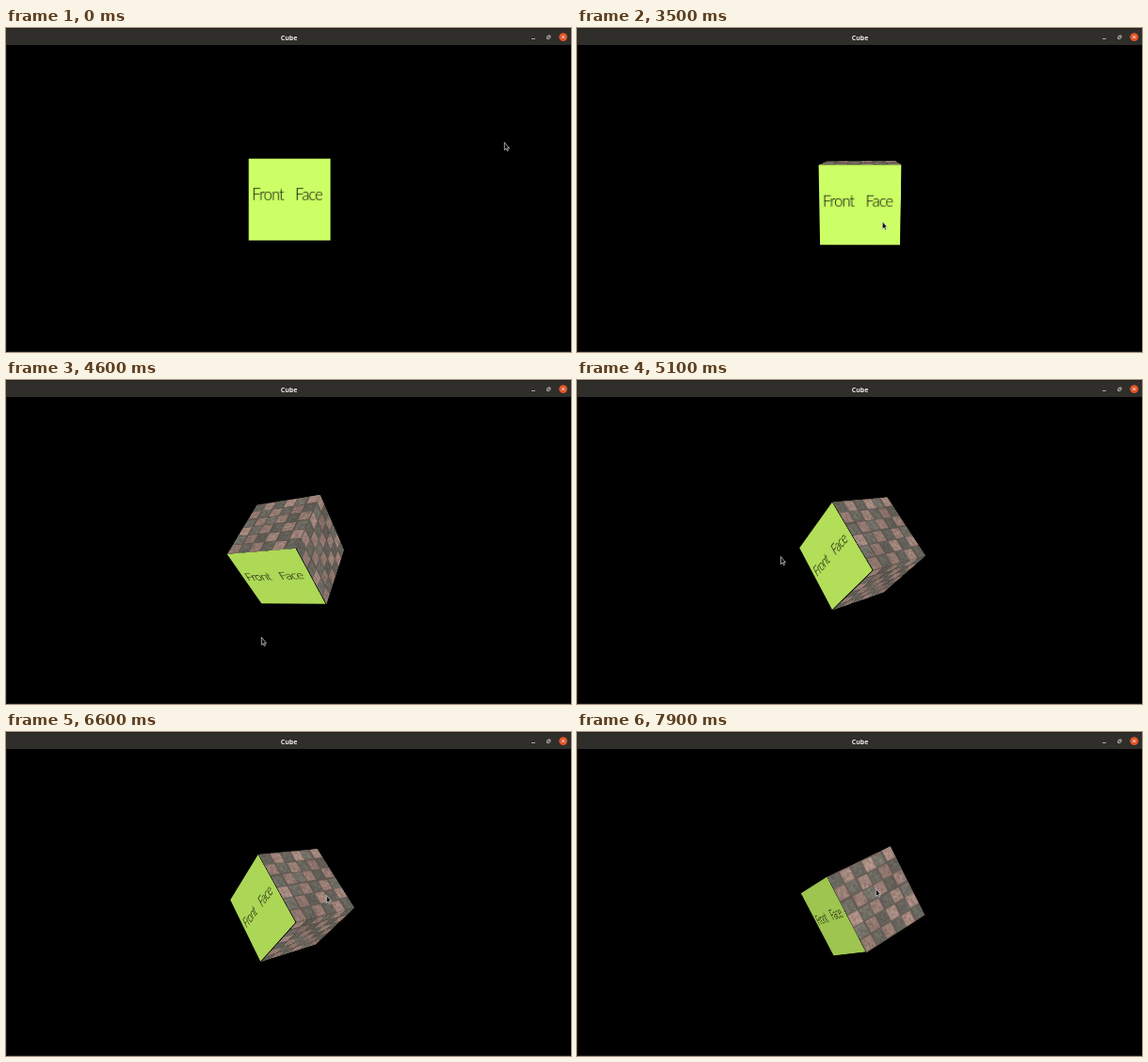
Animation of 600 by 344 pixels, one loop 8000 ms. Source, as an HTML page with a canvas:

```html
<!DOCTYPE html>
<html lang="en">
<head>
<meta charset="utf-8">
<title>Cube</title>
<style>
  html, body { margin: 0; width: 100%; height: 100%; overflow: hidden; background: #000; }
  #stage { position: relative; width: 600px; height: 344px; overflow: hidden; background: #000;
    perspective: 394px; perspective-origin: 300.9px 181.9px; }
  #chrome, #cursor { position: absolute; left: 0; top: 0; }
  #cube { position: absolute; left: 261.5px; top: 142.5px; width: 78.8px; height: 78.8px;
    transform-style: preserve-3d; }
  .face { position: absolute; left: 0; top: 0; width: 78.8px; height: 78.8px; backface-visibility: hidden; }
  #front { background: #cf6; transform: translateZ(39.2px); }
  #right { transform: rotateY(90deg) translateZ(39.2px); }
  #top { transform: rotateX(90deg) translateZ(39.2px); }
  #bottom { transform: rotateX(-90deg) translateZ(39.2px); }
  #front text { font: 300 16.5px Lato, sans-serif; letter-spacing: -.9px; }
  #chrome text { font: 700 7px "Noto Sans", sans-serif; fill: #eeece8; }
</style>
</head>
<body>
<div id="stage">
  <svg id="chrome" width="600" height="344">
    <path d="M.5 18V343.5H600" fill="none" stroke="#1b1718"/>
    <rect width="600" height="18" fill="#2f2e2b"/>
    <rect width="600" height="1" fill="#242321"/>
    <text x="300.5" y="12.5" text-anchor="middle">Cube</text>
    <path d="M558 11.5h4M574.5 9h2.5v2.5h-2.5zM575.5 8h2.5v2.5" fill="none" stroke="#c9c7c3" stroke-width=".8"/>
    <circle cx="591.7" cy="9.6" r="4.4" fill="#e2562a"/>
    <path d="M590.2 8.1l3 3m0-3l-3 3" stroke="#fff" stroke-width=".8"/>
  </svg>
  <div id="cube">
    <svg id="front" class="face" viewBox="0 0 87 87">
      <text x="3.6" y="44.2">Front <tspan x="48.9">Face</tspan></text>
    </svg>
    <canvas id="right" class="face" width="192" height="192"></canvas>
    <canvas id="top" class="face" width="192" height="192"></canvas>
    <canvas id="bottom" class="face" width="192" height="192"></canvas>
  </div>
  <svg id="cursor" width="10" height="14" overflow="visible">
    <path d="M.3.4V8.6L2.1 7l1.2 2.6 1.2-.6L3.4 6.5H5.5z" fill="#111" stroke="#ddd" stroke-width=".7"/>
  </svg>
</div>
<script>
const $ = id => document.getElementById(id);
const LOOP = 8000, STEP = 100;
const YAW = .58, PITCH = .51; // degrees turned per dragged pixel

// Pointer path; dragging turns the cube
const PATH = [
  { t: 2300, x: 529, y: 121 },
  { t: 3200, x: 325, y: 188 },
  { t: 3500, x: 324, y: 205, drag: true },
  { t: 4100, x: 316, y: 293, drag: true },
  { t: 4300, x: 304, y: 314, drag: true },
  { t: 4700, x: 260, y: 259, drag: true },
  { t: 5100, x: 216, y: 187, drag: true },
  { t: 5400, x: 208, y: 187, drag: true },
  { t: 5800, x: 236, y: 184 },
  { t: 6300, x: 340, y: 173 },
  { t: 6600, x: 340, y: 173 },
  { t: 7000, x: 318, y: 112 },
  { t: 7500, x: 318, y: 158, drag: true },
  { t: 7900, x: 317, y: 166, drag: true }
];

// Worn checkerboard of pink and grey paving stones
function paintStones(canvas) {
  const c = canvas.getContext('2d'), n = 6, size = 192 / n, side = size - 3;
  let seed = 7;
  const rnd = () => (seed = seed * 16807 % 2147483647) / 2147483647;
  const tone = (rgb, k) => `rgb(${rgb.map(v => v * k)})`;
  c.fillStyle = '#625852';
  c.fillRect(0, 0, 192, 192);
  for (let i = 0; i < n * n; i++) {
    const col = i % n, row = i / n | 0;
    const base = (col + row) % 2 ? [166, 138, 128] : [113, 111, 102];
    const x = col * size + rnd() * 3, y = row * size + rnd() * 3;
    const shade = .9 + rnd() * .2;
    c.fillStyle = tone(base, shade);
    c.fillRect(x, y, side, side);
    for (let j = 0; j < 40; j++) {
      const w = 2 + rnd() * 4, h = 2 + rnd() * 4;
      c.fillStyle = rnd() < .05 ? '#96535180' : tone(base, shade * (.82 + rnd() * .36));
      c.fillRect(x + rnd() * (side - w), y + rnd() * (side - h), w, h);
    }
  }
}

function turn(matrix, dx, dy) {
  const yaw = dx * YAW, pitch = -dy * PITCH, angle = Math.hypot(yaw, pitch);
  return angle ? new DOMMatrix().rotateAxisAngle(pitch, yaw, 0, angle).multiply(matrix) : matrix;
}

function pose(time) {
  let spin = new DOMMatrix(), { t, x, y } = PATH[0];
  for (const next of PATH) {
    if (time <= t) break;
    const f = Math.min(1, (time - t) / (next.t - t || 1));
    const dx = (next.x - x) * f, dy = (next.y - y) * f;
    if (next.drag) spin = turn(spin, dx, dy);
    x += dx;
    y += dy;
    t = next.t;
  }
  return { spin, x, y };
}

function light(id, ambient, diffuse, facing) {
  $(id).style.filter = `brightness(${Math.min(1, ambient + diffuse * Math.max(0, facing))})`;
}

function draw(time) {
  const { spin, x, y } = pose(time);
  $('cube').style.transform = spin;
  $('cursor').style.transform = `translate(${x}px,${y}px)`;
  light('front', .55, .47, spin.m33);
  light('right', .8, .2, spin.m13);
  light('top', .8, .2, -spin.m23);
  light('bottom', .8, .2, spin.m23);
}

['right', 'top', 'bottom'].forEach(id => paintStones($(id)));
const start = performance.now();
function tick() {
  const time = (performance.now() - start) % LOOP;
  draw(Math.floor(time / STEP) * STEP);
  requestAnimationFrame(tick);
}
tick();
</script>
</body>
</html>
```
